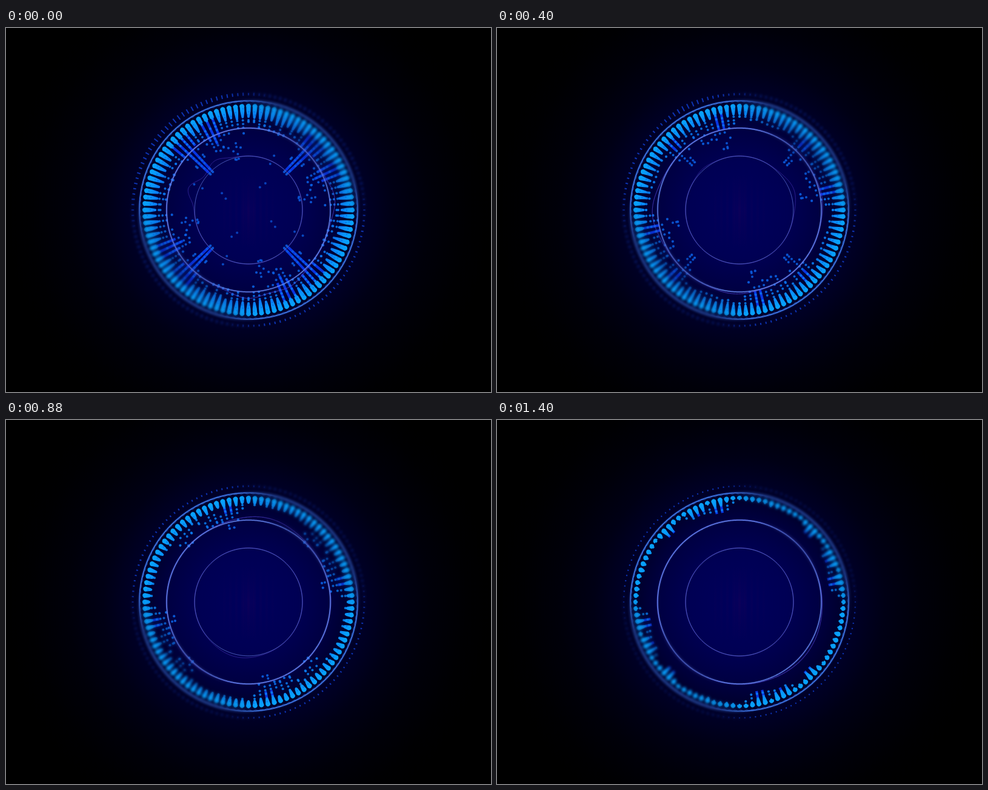
These frames come from a looping animation (800 px wide and 600 px high, 1.44 s). An HTML page with a canvas:

```html
<!DOCTYPE html>
<html lang="en">
<head>
<meta charset="utf-8">
<title>Radial spectrum</title>
<style>
html, body { margin: 0; width: 100%; height: 100%; overflow: hidden; background: #000; }
canvas { display: block; width: 800px; height: 600px; }
</style>
</head>
<body>
<canvas id="stage" width="800" height="600"></canvas>
<script>
const W = 800, H = 600, LOOP = 1440, STEP = 40, TAU = Math.PI * 2;
const BARS = 25, TICKS = 136, HEAD = 171;

const layer = () => Object.assign(document.createElement("canvas"), { width: W, height: H }).getContext("2d");
const stage = document.getElementById("stage").getContext("2d");
const art = layer(), soft = layer(), back = layer();

const mix = (a, b, k) => a + (b - a) * k;
const decay = (t, life) => Math.exp(-t / life);
const bell = (d, w) => Math.exp(-(d * d) / (w * w));
const rnd = (a, b) => {
  const v = Math.sin(a * 127.1 + b * 311.7 + 4.3) * 43758.5453;
  return v - Math.floor(v);
};
const barAngle = (i, quad) => Math.PI + (i + quad * BARS) * TAU / (4 * BARS);

// Each quadrant repeats three peaks: a solid part and a dotted tip, both sinking to the rim
const PEAKS = [
  { at: 12.5, spread: 1.1, solid: t => 157 - 67 * decay(t, 250), tip: u => mix(86, 163, u) },
  { at: 18, spread: 1.4, solid: t => 156 - 36 * decay(t, 150), tip: u => mix(108, 156, u) },
  { at: 21.5, spread: 1.4, solid: t => 150 - 20 * beat(t) * (1 - t / LOOP), tip: u => mix(86, 148, u) }
];
const beat = t => Math.max(0, Math.cos((t - 400) / 320 * TAU));

// Loose dots flying to the rim: radius, bar position
const LOOSE = [[52, 9], [42, 7.4], [84, 7], [85, 21.3], [99, 7]];

function ramp(g, stops) {
  for (const [at, color] of stops) g.addColorStop(at, color);
  return g;
}
const radial = (r, stops) => ramp(art.createRadialGradient(0, 0, 0, 0, 0, r), stops);

const bodyFill = radial(180, [[.78, "#0a60f0"], [.87, "#0a86f8"], [.93, "#089cfc"], [1, "#08a8fe"]]);
const dotFill = radial(180, [[.2, "#0a4cd0"], [.7, "#0a60e4"], [.85, "#0a80f4"], [1, "#0a9cff"]]);

function paintBack() {
  back.fillStyle = ramp(back.createRadialGradient(400, 300, 0, 400, 300, 400), [
    [0, "#00005c"], [.2, "#000054"], [.32, "#000044"], [.41, "#000030"], [.48, "#000026"],
    [.6, "#000015"], [.75, "#000009"], [.9, "#000002"], [1, "#000"]
  ]);
  back.fillRect(0, 0, W, H);
  back.fillStyle = ramp(back.createRadialGradient(400, 303, 0, 400, 303, 64), [
    [0, "rgba(75,0,75,.08)"], [1, "rgba(60,0,80,0)"]
  ]);
  for (let x = 360; x <= 440; x += 10) back.fillRect(x - 2, 235, 4, 135);
  back.fillRect(391, 235, 18, 125);
}

function dot(r, a, size, alpha) {
  art.globalAlpha = alpha;
  art.beginPath();
  art.arc(r * Math.cos(a), r * Math.sin(a), size, 0, TAU);
  art.fill();
}

function spoke(a, from, to, width, color) {
  const c = Math.cos(a), s = Math.sin(a);
  art.strokeStyle = color;
  art.lineWidth = width;
  art.beginPath();
  art.moveTo(from * c, from * s);
  art.lineTo(to * c, to * s);
  art.stroke();
}

// Round head with a neck that thins towards the centre
function body(a, end, neck) {
  art.save();
  art.rotate(a);
  art.fillStyle = bodyFill;
  art.beginPath();
  art.arc(HEAD, 0, 4, -2, 2);
  art.lineTo(Math.max(end + 2, 163), neck);
  art.lineTo(end + 2, 2);
  art.arc(end + 2, 0, 2, Math.PI / 2, Math.PI * 1.5);
  art.lineTo(Math.max(end + 2, 163), -neck);
  art.closePath();
  art.fill();
  art.restore();
}

function drawBar(i, quad, t) {
  const a = barAngle(i, quad), u = t / 1400;
  const base = mix(150, 166, u) + (rnd(i, 1) - .5) * 4;
  const rest = base - 12 * decay(t, 400) * (.4 + 1.2 * rnd(i, 2));
  let end = base, tip = rest;
  for (const p of PEAKS) {
    const d = Math.max(0, Math.abs(i - p.at) - .55);
    end = Math.min(end, mix(base, p.solid(t), bell(d, .75)));
    tip = Math.min(tip, mix(rest, p.tip(u), bell(d, p.spread)));
  }
  tip = Math.min(tip, end);
  const tall = base - end > 6;

  art.globalAlpha = 1;
  if (tall) spoke(a, 163, end, 4.2, "rgba(10,64,255,.85)");
  body(a, tall ? 160 : base, mix(2.4, 3.5, decay(t, 400)));

  art.fillStyle = "#0840d0";
  for (let r = 167; r > base + 4; r -= 5) {
    if (rnd(i, r) > .5) dot(r, a + (rnd(r, i) - .5) * .02, 1, .5);
  }

  art.fillStyle = dotFill;
  for (let r = 160; r > tip; r -= 6) {
    const depth = end - r;
    if (depth < 0 && !tall) continue;
    const chance = depth < 0 ? .7 : Math.max(.22, .95 - depth / 42);
    if (rnd(i, r) < chance) dot(r, a, 2, .85);
  }
  if (tip < end - 2) dot(tip, a, 2.1, .9);
}

function drawBars(t) {
  for (let quad = 0; quad < 4; quad++) {
    for (let i = 0; i < BARS; i++) drawBar(i, quad, t);
    art.fillStyle = dotFill;
    for (const [r0, i] of LOOSE) {
      const r = r0 + t * .3;
      if (r < 140) dot(r, barAngle(i, quad), 2, .8);
    }
  }
  art.globalAlpha = 1;
}

// Ticks lengthen on the upper left at the start and again at 400 ms
function drawTicks(t) {
  const fade = 1 - t / LOOP, kick = decay(t, 90), echo = bell(t - 400, 90);
  for (let n = 0; n < TICKS; n++) {
    const deg = n * 360 / TICKS;
    const len = 2.2 + fade * (1 + rnd(n, 3) + bell(deg - 205, 60))
      + 4 * kick * bell(deg - 232, 28) + 5 * echo * bell(deg - 242, 12);
    spoke(deg * TAU / 360, 191 - len / 2, 191 + len / 2, 2, "#0e34b4");
  }
}

function loop(radius, width, color) {
  art.strokeStyle = color;
  art.lineWidth = width;
  art.beginPath();
  for (let n = 0; n < 720; n++) {
    const a = n * TAU / 720, r = radius(n / 2);
    art.lineTo(r * Math.cos(a), r * Math.sin(a));
  }
  art.closePath();
  art.stroke();
}

function bump(deg, at, height, width) {
  const d = ((deg - at + 180) % 360 + 360) % 360 - 180;
  return height * bell(d, width);
}

function drawRings(t) {
  const left = 1 - t / LOOP, width = 13 + t / 80;
  // one bump runs round each wave, the others die where they started
  const outer = deg => 135.5 + bump(deg, 90 + .22 * t, 4 + 6 * left, width)
    + bump(deg, 62 + .08 * t, 8 * decay(t, 400), 13) + bump(deg, -8, 8 * decay(t, 300), 13);
  const inner = deg => 89.3 + bump(deg, 235 + .26 * t, 9 * left, width)
    + bump(deg, 200 + .07 * t, 16 * decay(t, 180), 11);
  const flat = r => () => r;
  loop(outer, 1.2, "rgba(86,70,214,.6)");
  loop(inner, 1, "rgba(86,62,200,.55)");
  loop(flat(135), 4, "rgba(80,100,225,.14)");
  loop(flat(135), 1.5, "rgba(104,138,242,.9)");
  loop(flat(88.8), 1, "rgba(100,120,220,.8)");
  loop(flat(180), 4, "rgba(40,90,220,.2)");
  loop(flat(180), 1.7, "rgba(66,124,236,.95)");
  loop(deg => 179 + .9 * Math.sin(deg * TAU / 3), .8, "rgba(70,130,240,.6)");
}

// Keeps the diagonal band, or with side set only the two corners beside it
function mask(ctx, side) {
  const keep = [1, 1, 0, 0, 1, 1], at = [0, .06, .19, .81, .94, 1];
  const g = ctx.createLinearGradient(273, 427, 527, 173);
  ramp(g, at.map((p, n) => [p, `rgba(0,0,0,${side ? keep[n] : 1 - keep[n]})`]));
  ctx.globalCompositeOperation = "destination-in";
  ctx.fillStyle = g;
  ctx.fillRect(0, 0, W, H);
  ctx.globalCompositeOperation = "source-over";
}

function render(t) {
  art.clearRect(0, 0, W, H);
  art.save();
  art.translate(400, 300);
  drawTicks(t);
  drawBars(t);
  drawRings(t);
  art.restore();

  soft.clearRect(0, 0, W, H);
  soft.filter = "blur(2.1px)";
  soft.drawImage(art.canvas, 0, 0);
  soft.filter = "none";
  mask(soft, true);
  mask(art, false);
  art.globalCompositeOperation = "lighter";
  art.drawImage(soft.canvas, 0, 0);
  art.globalCompositeOperation = "source-over";

  stage.drawImage(back.canvas, 0, 0);
  stage.drawImage(art.canvas, 0, 0);
}

paintBack();
let shown = -1;
const start = performance.now();
function tick(now) {
  const t = Math.floor((Math.max(0, now - start) % LOOP) / STEP) * STEP;
  if (t !== shown) render(shown = t);
  requestAnimationFrame(tick);
}
render(0);
requestAnimationFrame(tick);
</script>
</body>
</html>
```
